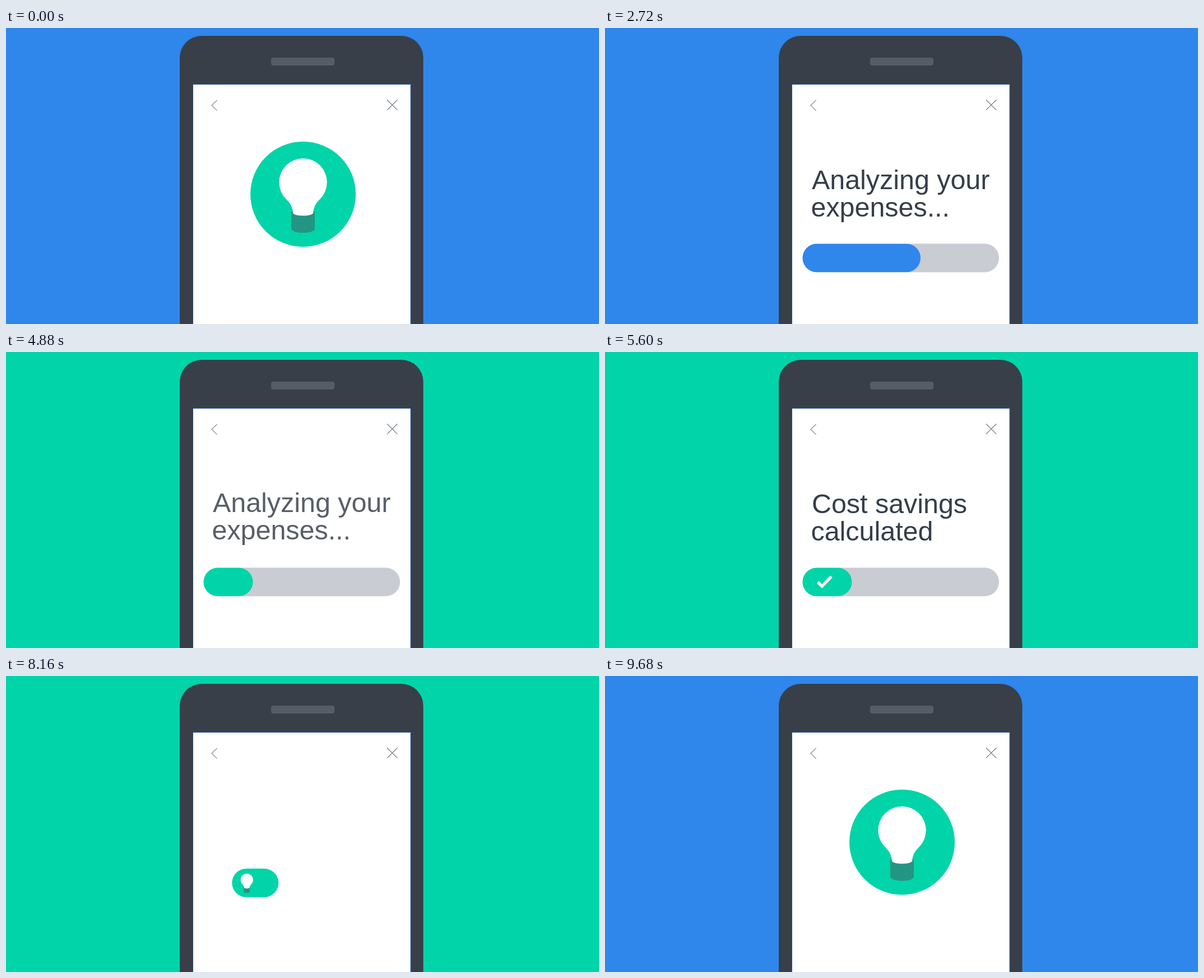
An HTML page with a canvas for the animation above (9.76 s loop, 1058 by 529 pixels).

```html
<!DOCTYPE html>
<html lang="en">
<head>
<meta charset="utf-8">
<style>
  html, body { margin: 0; height: 100%; overflow: hidden; }
  canvas { display: block; }
</style>
</head>
<body>
<canvas id="stage" width="1058" height="529"></canvas>
<script>
const ctx = document.getElementById('stage').getContext('2d');
const LOOP = 9760, STEP = 80;
const BLUE = [47, 134, 235], GREEN = [0, 212, 168], TEAL = [31, 198, 166];
const BAR = { x: 352.5, y: 385.5, w: 350.5, h: 51 };
const BACK = 1.2;

const lerp = (a, b, p) => a + (b - a) * p;
const span = (t, from, to) => Math.min(1, Math.max(0, (t - from) / (to - from)));
const easeOut = p => 1 - (1 - p) ** 3;
const easeInOut = p => p < .5 ? 2 * p * p : 1 - 2 * (1 - p) ** 2;
const backIn = p => p * p * ((BACK + 1) * p - BACK);
const backOut = p => 1 - backIn(1 - p);
const mix = (a, b, p) => a.map((v, i) => lerp(v, b[i], p));
const rgb = c => `rgb(${c.map(Math.round)})`;

// Right end of the bar's fill: [start, end, position reached]
const fillMoves = [
  [2000, 2240, 581], [2640, 2880, 527], [3200, 3440, 507],
  [3840, 4080, 473], [4400, 4640, 440.5]
];

// [first line, second line, in from, in to, out from]
const messages = [
  ['Analyzing your', 'expenses...', 800, 1280, 4800],
  ['Cost savings', 'calculated', 5040, 5440, 6400],
  ['Opportunities', 'identified', 6720, 7280, 7760]
];

function box(x, y, w, h, r, color) {
  ctx.fillStyle = color;
  ctx.beginPath();
  ctx.roundRect(x, y, w, h, r);
  ctx.fill();
}

function stroke(path, color, width) {
  ctx.strokeStyle = color;
  ctx.lineWidth = width;
  ctx.stroke(new Path2D(path));
}

function placed(x, y, scale, draw) {
  if (scale <= 0) return;
  ctx.save();
  ctx.translate(x, y);
  ctx.scale(scale, scale);
  draw();
  ctx.restore();
}

function background(t) {
  if (t <= 9440) return mix(BLUE, GREEN, span(t, 4400, 4640));
  return t <= 9520 ? mix(GREEN, TEAL, span(t, 9440, 9520))
                   : mix(TEAL, BLUE, span(t, 9520, 9680));
}

function phone() {
  box(310, 14, 434.5, 600, 39, '#383f49');
  box(473, 53, 113, 14, 4, '#565d66');
  box(333.5, 100.3, 389, 500, 0, '#2f62b0');
  box(334, 101.3, 387.5, 500, 0, '#fff');
  stroke('M376.5 129 L367 138.2 L376.5 147.5', '#84909c', 1.2);
  stroke('M680 128.5 L698.2 146.7 M698.2 128.5 L680 146.7', '#6f7a86', 1.2);
}

// Bulb drawn around its own middle, 134 units high
function bulb() {
  ctx.fillStyle = '#239683';
  ctx.fill(new Path2D('M-21 28 H21 V60 Q17 66.5 0 66.5 Q-17 66.5 -21 60 Z'));
  ctx.fillStyle = '#fff';
  ctx.fill(new Path2D('M-30 6.5 A42.7 42.7 0 1 1 30 6.5 Q18.5 17 17.8 32 ' +
    'Q13 36 0 36 Q-13 36 -17.8 32 Q-18.5 17 -30 6.5 Z'));
}

function badge(x, y, w, h, bulbX, bulbScale) {
  box(x - w / 2, y - h / 2, w, h, h / 2, rgb(GREEN));
  placed(x + bulbX, y + 2.5 * bulbScale, bulbScale, bulb);
}

function openingBadge(t) {
  placed(530, 297, 1 - backIn(span(t, 0, 320)), () => badge(0, 0, 188, 188, 0, 1));
}

function progressBar(t) {
  let end = lerp(BAR.x, 604, easeOut(span(t, 1360, 1840)));
  for (const [from, to, x] of fillMoves) end = lerp(end, x, span(t, from, to));
  const width = lerp(BAR.w, 88, easeInOut(span(t, 7760, 8000)));
  const pop = backOut(span(t, 400, 800));

  placed(527.75, 411, pop, () => {
    ctx.translate(-527.75, -411);
    box(BAR.x, BAR.y, width, BAR.h, 25.5, '#c9ccd3');
    ctx.clip();
    box(end - 500, BAR.y, 500, BAR.h, 25.5, rgb(background(t)));
  });
  const check = t < 7000 ? backOut(span(t, 5440, 5920)) : 1 - span(t, 7760, 7920);
  placed(391.5, 411, check, () => stroke('M-13.5 .5 L-5 8.5 L14 -11', '#fff', 6));
}

function closingBadge(t) {
  const move = easeInOut(span(t, 7990, 8390));
  const grow = backOut(span(t, 8160, 8800));
  const width = lerp(88 - 14 * move, 188, grow);
  const bulbScale = lerp(.26 * span(t, 7920, 8080), 1, grow);
  badge(lerp(396.5, 530, move), lerp(411, 297, move), width,
    lerp(51, 188, grow), -15 * (1 - grow), bulbScale);
}

function message(t, [first, second, inFrom, inTo, outFrom]) {
  const enter = easeOut(span(t, inFrom, inTo));
  const leave = span(t, outFrom, outFrom + 240) ** 1.6;
  const y = 288 + 12 * (1 - enter) - 11 * leave;
  ctx.globalAlpha = enter * (1 - leave);
  ctx.fillStyle = '#363e49';
  ctx.font = '48.4px "Liberation Sans", Arial, sans-serif';
  ctx.fillText(first, 369, y);
  ctx.fillText(second, 367.5, y + 49);
  ctx.globalAlpha = 1;
}

function frame(now) {
  const t = Math.floor(now % LOOP / STEP) * STEP;
  ctx.fillStyle = rgb(background(t));
  ctx.fillRect(0, 0, 1058, 529);
  phone();
  if (t < 400) openingBadge(t);
  else if (t < 8000) progressBar(t);
  else closingBadge(t);
  for (const m of messages) message(t, m);
  requestAnimationFrame(frame);
}
requestAnimationFrame(frame);
</script>
</body>
</html>
```
